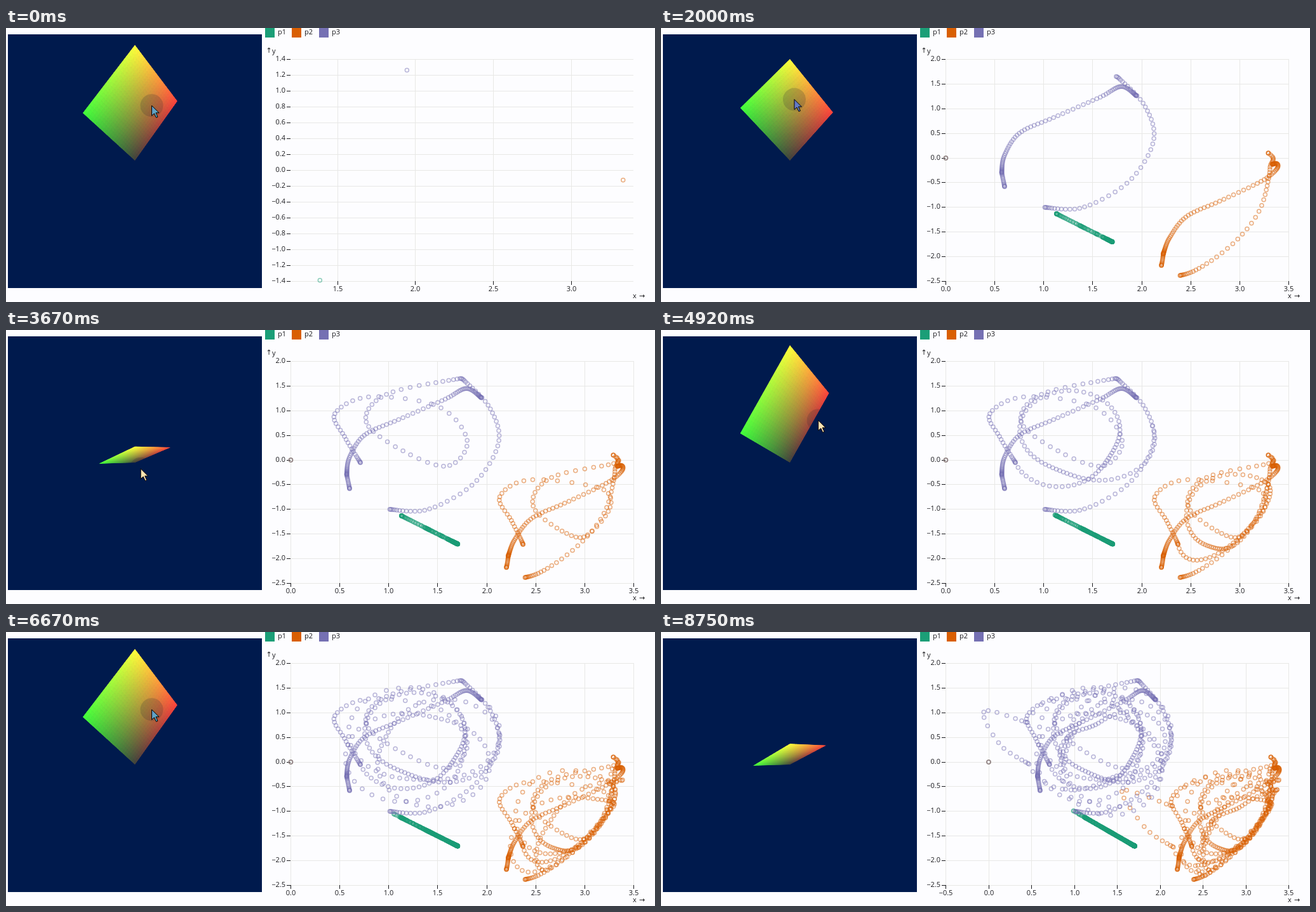
An HTML page with a canvas that plays this animation: 1022x432 px, repeating every 9260 ms.

```html
<!DOCTYPE html>
<html lang="en">
<head>
<meta charset="utf-8">
<title>Quad corners</title>
<style>
html, body { margin: 0; width: 100%; height: 100%; overflow: hidden; background: #fdfdff; }
canvas { display: block; }
</style>
</head>
<body>
<canvas id="stage" width="1022" height="432"></canvas>
<script>
const ctx = document.getElementById('stage').getContext('2d');
const LOOP = 9260, LAST = 105, RATE = 6;
const FOCAL = 1 + Math.SQRT2;
const SERIES = [
  { name: 'p1', x: 408, color: '#1b9e77' },
  { name: 'p2', x: 450, color: '#d95f02' },
  { name: 'p3', x: 493, color: '#7570b3' }
];
const INK = '#1b1b1f';
const FONT = '11px "Open Sans", "Noto Sans", sans-serif';
const ARROW_FONT = '11px "DejaVu Sans", sans-serif';
const PLOT = { l: 448, r: 988, t: 49, b: 399 };
const CENTER = { x: 203, y: 209 };

const mix = (a, b, u) => a + (b - a) * u;
const ease = u => u * u * (3 - 2 * u);
const spline = (a, b, c, d, u) =>
  b + u * (c - a + u * (2 * a - 5 * b + 4 * c - d + u * (3 * (b - c) + d - a))) / 2;

// A smooth stroke through a few points.
function stroke(...pts) {
  const n = pts.length - 1;
  const at = (j, c) => pts[Math.max(0, Math.min(n, j))][c];
  return u => {
    const pos = mix(u, ease(u), .7) * n, i = Math.min(n - 1, Math.floor(pos));
    return [0, 1].map(c => spline(at(i - 1, c), at(i, c), at(i + 1, c), at(i + 2, c), pos - i));
  };
}

// Counter-clockwise turns around a hub, swinging in and out.
const HUB = [1.35, .3], REACH = [.85, 1.3];
function orbit(a, b, turns) {
  const polar = p => {
    const x = (p[0] - HUB[0]) / REACH[0], y = (p[1] - HUB[1]) / REACH[1];
    return [Math.hypot(x, y), Math.atan2(y, x)];
  };
  const [ra, fa] = polar(a), [rb, fb] = polar(b);
  const full = 2 * Math.PI;
  const sweep = (fb - fa + full) % full + full * turns;
  return u => {
    const r = mix(ra, rb, u) * (1 - .5 * Math.sin(Math.PI * u * (turns + 1)) ** 2);
    const f = fa + sweep * u;
    return [HUB[0] + REACH[0] * r * Math.cos(f), HUB[1] + REACH[1] * r * Math.sin(f)];
  };
}

// The up vector of the view, leg by leg.
const FRONT = [1.945, 1.265], TOP = [1.745, 1.66], LOW = [.71, -.05];
const RIGHT = [2.107, .695], LEFT = [.45, .8], BACK = [.47, -.04], END = [.87, -.05];
const legs = [
  { from: 0, to: 13, move: stroke(FRONT, [1.79, 1.45], [1.57, 1.23], [1.1, .82], [.755, .51], [.6, .06], [.57, -.29]) },
  { from: 13, to: 15.5, move: stroke([.57, -.29], [.6, -.58]) },
  { from: 16, to: 24, move: stroke([1.01, -1], [1.4, -1], [1.87, -.47], [2.12, .35], [2.03, 1.06], TOP) },
  { from: 24, to: 36, move: stroke(TOP, [.985, 1.34], [.77, .77], [1.15, .18], [1.6, -.12], [1.8, .4],
    [1.5, 1.09], [.8, 1.28], [.45, .94], [.55, .47], LOW) },
  { from: 44, to: 59, move: orbit(LOW, RIGHT, 1) },
  { from: 59, to: 80, move: orbit(RIGHT, FRONT, 3) },
  { from: 80, to: 89, move: orbit(FRONT, LEFT, 1) },
  { from: 89, to: 92, move: stroke(LEFT, [-.05, 1.03], [.13, .36], BACK) },
  { from: 92, to: 101, move: orbit(BACK, END, 1) }
];

function upAt(k) {
  const { from, to, move } = legs.filter(l => l.from <= k).pop();
  const up = move(Math.min(1, (k - from) / (to - from)));
  const fit = Math.min(1, 2.4 / Math.hypot(...up));
  return up.map(c => c * fit);
}

// Completes the orthonormal view from its up vector.
function viewAt(k) {
  const up = upAt(k);
  const bx = up[0] / FOCAL, by = up[1] / FOCAL, sum = bx + by;
  const a2 = Math.min(.5, (1.0068 - bx * bx - by * by) / (2.02 - sum * sum));
  const depth = b => Math.sqrt(Math.max(0, 1 - a2 - b * b));
  const over = sum - 1.16;
  return {
    up, bx, by, sum,
    side: FOCAL * Math.sqrt(a2),
    zx: Math.sign(a2 - bx * by) * depth(bx),
    zy: depth(by),
    dist: 3.85 + (over < 0 ? -3.1 * over : 32 * over ** 3)
  };
}

// Every plotted dot, with the time it appears.
const dots = [[], [], []];
let prev = '';
for (let i = 0; i <= LAST * RATE; i++) {
  const k = i / RATE, { up: [x, y], side } = viewAt(k);
  const add = (s, x, y) => dots[s].push({ k, x, y });
  if (k === 16) dots.forEach((_, s) => add(s, 0, 0));
  if (prev === (prev = x + ',' + y)) continue;
  add(0, side, -side);
  add(1, x + side, y - side);
  add(2, x, y);
}

function tickStep(span, count) {
  const raw = span / count, p = 10 ** Math.floor(Math.log10(raw)), e = raw / p;
  return p * (e >= Math.sqrt(50) ? 10 : e >= Math.sqrt(10) ? 5 : e >= Math.SQRT2 ? 2 : 1);
}

function nice(values) {
  const lo = Math.min(...values), hi = Math.max(...values), s = tickStep(hi - lo, 10);
  return [Math.floor(lo / s) * s, Math.ceil(hi / s) * s];
}

function domains(all, k) {
  if (k < 10) return [nice(all.map(d => d.x)), nice(all.map(d => d.y))];
  if (k < 16) return [[0, 4], [-2, 1.5]];
  return [[all.some(d => d.x < 0) ? -.5 : 0, 3.5], [-2.5, 2]];
}

function ticks([lo, hi], count) {
  const s = tickStep(hi - lo, count), out = [];
  for (let i = Math.ceil(lo / s - 1e-6); i <= hi / s + 1e-6; i++) out.push(i * s);
  return out;
}

function line(x1, y1, x2, y2, color) {
  ctx.strokeStyle = color;
  ctx.beginPath();
  ctx.moveTo(x1, y1);
  ctx.lineTo(x2, y2);
  ctx.stroke();
}

function text(str, x, y, align = 'left', font = FONT) {
  ctx.font = font;
  ctx.textAlign = align;
  ctx.fillStyle = INK;
  ctx.fillText(str, x, y);
}

function disc(x, y, r) {
  ctx.beginPath();
  ctx.arc(x, y, r, 0, 2 * Math.PI);
}

const label = v => (Math.abs(v) < 1e-6 ? '0.0' : v.toFixed(1)).replace('-', '\u2212');

function drawChart(k) {
  const shown = dots.map(s => s.filter(d => d.k <= k));
  const [dx, dy] = domains(shown.flat(), k);
  const sx = v => mix(PLOT.l, PLOT.r, (v - dx[0]) / (dx[1] - dx[0]));
  const sy = v => mix(PLOT.b, PLOT.t, (v - dy[0]) / (dy[1] - dy[0]));
  const grid = '#e8e8e6';
  ctx.lineWidth = 1;
  ctx.textBaseline = 'middle';
  for (const v of ticks(dy, 10)) {
    const y = Math.round(sy(v)) + .5;
    line(PLOT.l, y, PLOT.r, y, grid);
    line(442, y, 448, y, INK);
    text(label(v), 440, y, 'right');
  }
  for (const v of ticks(dx, 6.75)) {
    const x = Math.round(sx(v)) + .5;
    line(x, PLOT.t, x, PLOT.b, grid);
    line(x, 399, x, 405, INK);
    text(label(v), x, 412, 'center');
  }
  text('\u2191', 414, 36, 'center', ARROW_FONT);
  text('y', 419, 37);
  text('x', 987, 423);
  text('\u2192', 1006, 423, 'right', ARROW_FONT);

  ctx.lineWidth = 1.5;
  ctx.globalAlpha = .5;
  shown.forEach((list, s) => {
    ctx.strokeStyle = SERIES[s].color;
    for (const d of list) {
      disc(sx(d.x) + .5, sy(d.y) + .5, 3);
      ctx.stroke();
    }
  });
  ctx.globalAlpha = 1;

  for (const s of SERIES) {
    ctx.fillStyle = s.color;
    ctx.fillRect(s.x, 0, 15, 15);
    text(s.name, s.x + 20, 7.5);
  }
}

function path(points) {
  ctx.beginPath();
  points.forEach(p => ctx.lineTo(p[0], p[1]));
  ctx.closePath();
}

// The pointer steers the view; at the end it leaves through the bottom.
function pointerAt(k, v) {
  const leave = Math.max(0, (k - 101) / 4) ** 2;
  return [
    207 + 60 * (v.bx - v.by) * v.sum,
    232 - 40 * v.sum - 32 * v.sum ** 2 + 230 * leave
  ];
}

function drawQuad(v, mouse) {
  const N = 24, e = 1 / N;
  const at = (p, q) => {
    const w = (v.dist - v.zx * p - v.zy * q) / 200;
    return [CENTER.x + v.side * (p - q) / w, CENTER.y - (v.up[0] * p + v.up[1] * q) / w];
  };
  const cell = (p, q, size) =>
    path([at(p, q), at(p + size, q), at(p + size, q + size), at(p, q + size)]);
  const shade = n => Math.round(mix(64, 255, (n + .5) / N));
  ctx.save();
  ctx.beginPath();
  ctx.rect(3, 10, 400, 400);
  ctx.clip();
  cell(0, 0, 1);
  ctx.clip();
  ctx.lineWidth = 1;
  for (let i = 0; i < N; i++) {
    for (let j = 0; j < N; j++) {
      ctx.fillStyle = ctx.strokeStyle = `rgb(${shade(i)},${shade(j)},60)`;
      cell(i * e, j * e, e);
      ctx.fill();
      ctx.stroke();
    }
  }
  ctx.fillStyle = 'rgba(40,40,50,.2)';
  disc(mouse[0], mouse[1], 18);
  ctx.fill();
  ctx.restore();
}

function drawPointer([x, y]) {
  path([[0, 0], [0, 16], [4, 12.5], [7, 19], [9.5, 18], [6.5, 11.5], [11.5, 11.5]]
    .map(p => [x + p[0], y + p[1]]));
  ctx.globalCompositeOperation = 'difference';
  ctx.fillStyle = '#fff';
  ctx.fill();
  ctx.globalCompositeOperation = 'source-over';
  ctx.strokeStyle = '#000';
  ctx.lineWidth = 1;
  ctx.stroke();
}

function draw(k) {
  ctx.fillStyle = '#fdfdff';
  ctx.fillRect(0, 0, 1022, 432);
  ctx.fillStyle = '#001a4d';
  ctx.fillRect(3, 10, 400, 400);
  const v = viewAt(k), mouse = pointerAt(k, v);
  drawQuad(v, mouse);
  drawChart(k);
  if (k < LAST) drawPointer(mouse);
}

// Twelve pictures a second, each starting on a multiple of 10 ms.
const startOf = k => Math.round(k * 25 / 3) * 10;
const start = performance.now();
let current = -1;
function tick() {
  const t = (performance.now() - start) % LOOP;
  let k = Math.min(LAST, Math.floor(t * 12 / 1000));
  if (k < LAST && startOf(k + 1) <= t) k++;
  else if (startOf(k) > t) k--;
  if (k !== current) draw(current = k);
  requestAnimationFrame(tick);
}
tick();
</script>
</body>
</html>
```
